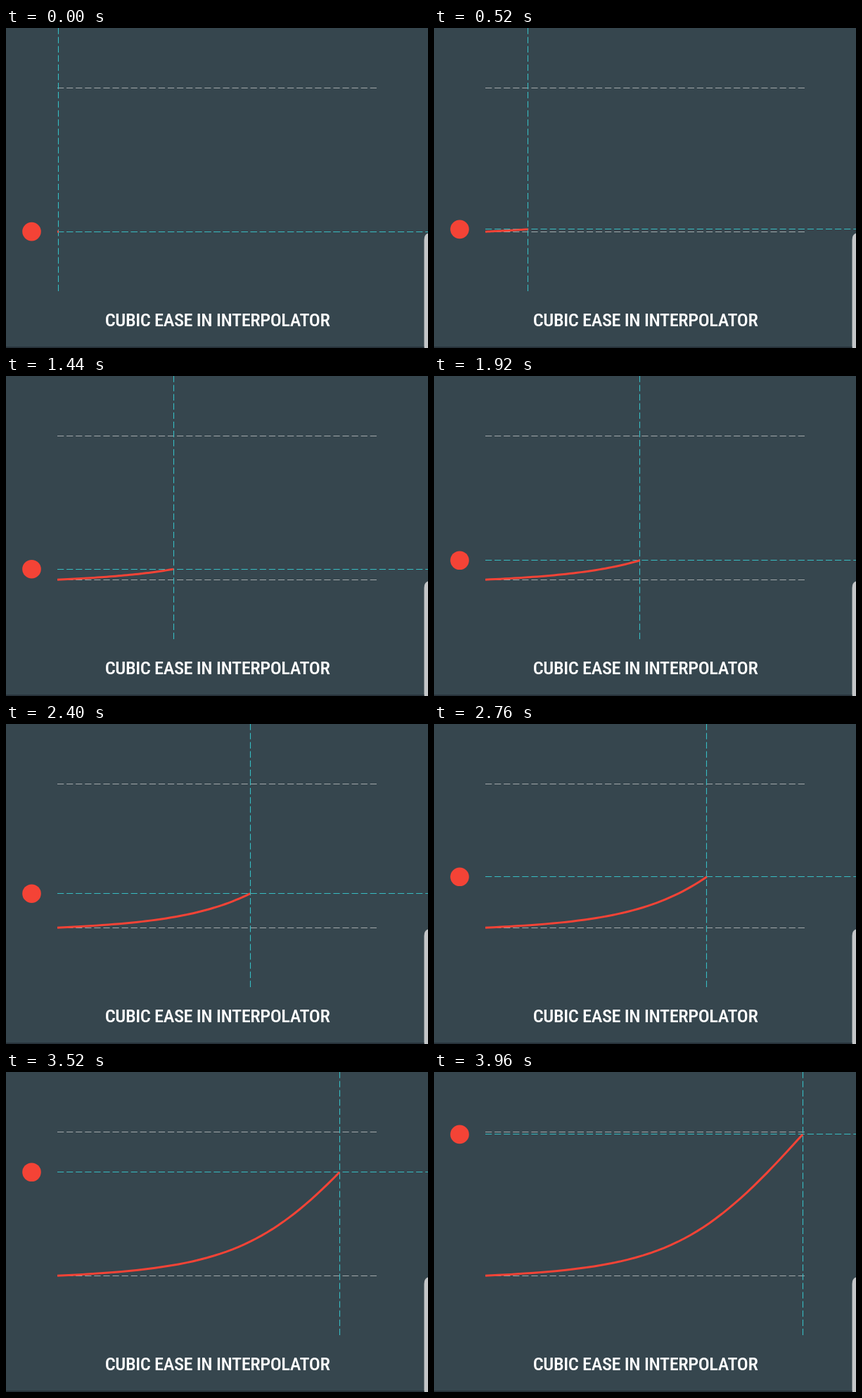
Animation, 600 px wide and 456 px high, one loop 4000 ms. Source, as an HTML page:

```html
<!DOCTYPE html>
<html lang="en">
<head>
<meta charset="utf-8">
<title>Cubic ease in</title>
<style>
  html, body { margin: 0; width: 100%; height: 100%; overflow: hidden; background: #36464e; }
  svg { display: block; width: 600px; height: 456px; }
  .dashed { stroke-width: 1.1; stroke-dasharray: 9.2 3.88; fill: none; }
  .bound { stroke: #a3a9ab; }
  .cross { stroke: #37bdc3; }
  text {
    font: 500 26.5px "Roboto Condensed", Roboto, sans-serif;
    font-stretch: condensed;
    letter-spacing: -0.016em;
    fill: #fff;
    text-anchor: middle;
  }
</style>
</head>
<body>
<svg viewBox="0 0 600 456">
  <path class="dashed bound" d="M73 85.5H527M73 290.5H527"/>
  <path class="dashed cross" id="level"/>
  <path class="dashed cross" id="cursor"/>
  <path id="trail" fill="none" stroke="#f44336" stroke-width="3"/>
  <circle id="ball" cx="36.5" r="13.3" fill="#f44336"/>
  <text x="300.5" y="425">CUBIC EASE IN INTERPOLATOR</text>
  <path d="M600 292.5Q594.5 294 594.5 302V456H600Z" fill="#c4c6c8"/>
  <path d="M0 454H594.5V456H0Z" fill="#27323a"/>
</svg>
<script>
const LOOP = 4000, STEP = 40;
const LEFT = 73, WIDTH = 454, BASE = 290.2, HEIGHT = 204.5;
const [level, cursor, trail, ball] =
  ["level", "cursor", "trail", "ball"].map(id => document.getElementById(id));

const bezier = (a, b, s) => 3 * a * s * (1 - s) ** 2 + 3 * b * s * s * (1 - s) + s ** 3;
const curveX = s => LEFT + WIDTH * bezier(0.55, 0.675, s);
const curveY = s => BASE - HEIGHT * bezier(0.055, 0.19, s);
const pixelCentre = v => Math.floor(v) + 0.5;

// Bisect for the curve parameter at a given horizontal position.
function parameterAt(x) {
  let low = 0, high = 1;
  for (let i = 0; i < 30; i++) {
    const mid = (low + high) / 2;
    if (curveX(mid) < x) low = mid; else high = mid;
  }
  return low;
}

function draw(now) {
  const time = Math.floor((now % LOOP) / STEP) * STEP;
  const x = LEFT + 1.7 + WIDTH * time / LOOP;
  const end = parameterAt(x);
  const y = curveY(end);
  const points = Array.from({ length: 41 }, (_, i) => {
    const s = end * i / 40;
    return `${curveX(s).toFixed(2)} ${curveY(s).toFixed(2)}`;
  });
  trail.setAttribute("d", "M" + points.join("L"));
  level.setAttribute("d", `M${LEFT} ${pixelCentre(y)}H600`);
  cursor.setAttribute("d", `M${pixelCentre(x)} 375V0`);
  ball.setAttribute("cy", y);
}

const start = performance.now();
function tick() {
  draw(performance.now() - start);
  requestAnimationFrame(tick);
}
tick();
</script>
</body>
</html>
```
